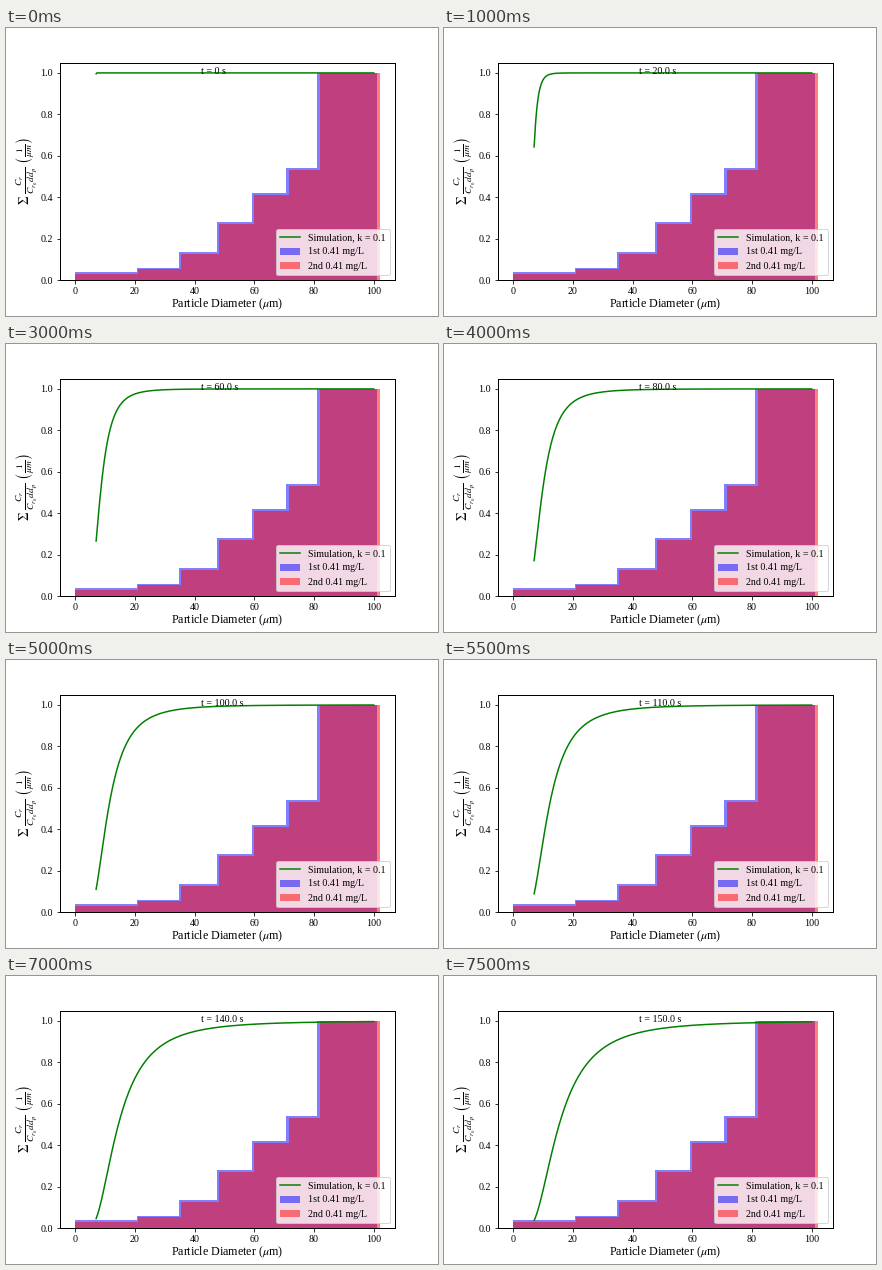
A matplotlib script for the animation above (8 s loop, 432 by 288 pixels).

```python
import numpy as np
import matplotlib.pyplot as plt
from matplotlib.animation import FuncAnimation

plt.rcParams.update({
    "font.family": "Liberation Serif",
    "mathtext.fontset": "stix",
    "font.size": 10,
    "axes.linewidth": 1.0,
})

FRAMES, INTERVAL, STEP = 16, 500, 10.0
D_MIN, D_MAX = 7.0, 100.0
RATE = 0.0221

diameters = np.linspace(D_MIN, D_MAX, 400)
edges = np.array([0, 20.75, 34.91, 47.6, 59.35, 70.75, 81.1, 101.0])
heights = np.array([0.0381, 0.0594, 0.1338, 0.2796, 0.4196, 0.5399, 1.0])


def cumulative(d, t):
    """Share of the mass in flocs no larger than d after t seconds."""
    t = max(t, 0.2)
    x = np.log(d / D_MIN)
    power = 2.04 * (150 / t) ** 0.67
    return np.exp(-RATE * t * np.exp(-power * x * (0.87 + 0.13 * x)))


def time_label(i):
    return "t = 0 s" if i == 0 else f"t = {i * STEP:.1f} s"


def draw_bars(ax, edges, heights, color, label):
    return ax.bar(edges[:-1], heights, np.diff(edges), align="edge",
                  color=color, alpha=0.5, label=label)


fig = plt.figure(figsize=(6, 4), dpi=72)
ax = fig.add_axes([0.125, 0.125, 0.775, 0.755])

first = draw_bars(ax, edges, heights, "b", "1st 0.41 mg/L")
lower = np.append(heights[:-1] - 0.0073, 1.0)
second = draw_bars(ax, edges * 1.0105, lower, "r", "2nd 0.41 mg/L")
line, = ax.plot(diameters, cumulative(diameters, 0), "g", lw=1.5,
                label="Simulation, k = 0.1")
clock = ax.text(42, 0.995, time_label(0))

ax.set_xlim(-5.1, 107.06)
ax.set_ylim(0, 1.05)
ax.set_xticks(range(0, 101, 20))
ax.set_yticks(np.arange(0, 1.01, 0.2))
ax.set_xlabel(r"Particle Diameter ($\mu$m)", fontsize=12, labelpad=1)
ax.set_ylabel(r"$\Sigma\ \frac{C_r}{C_{r_0}dd_p}\ \left(\frac{1}{\mu m}\right)$",
              fontsize=13.5, labelpad=1)
ax.legend(handles=[line, first, second], loc="lower right", labelspacing=0.55)


def update(i):
    line.set_ydata(cumulative(diameters, i * STEP))
    clock.set_text(time_label(i))
    return line, clock


anim = FuncAnimation(fig, update, frames=FRAMES, interval=INTERVAL,
                     repeat=True, repeat_delay=0)
plt.show()
```
